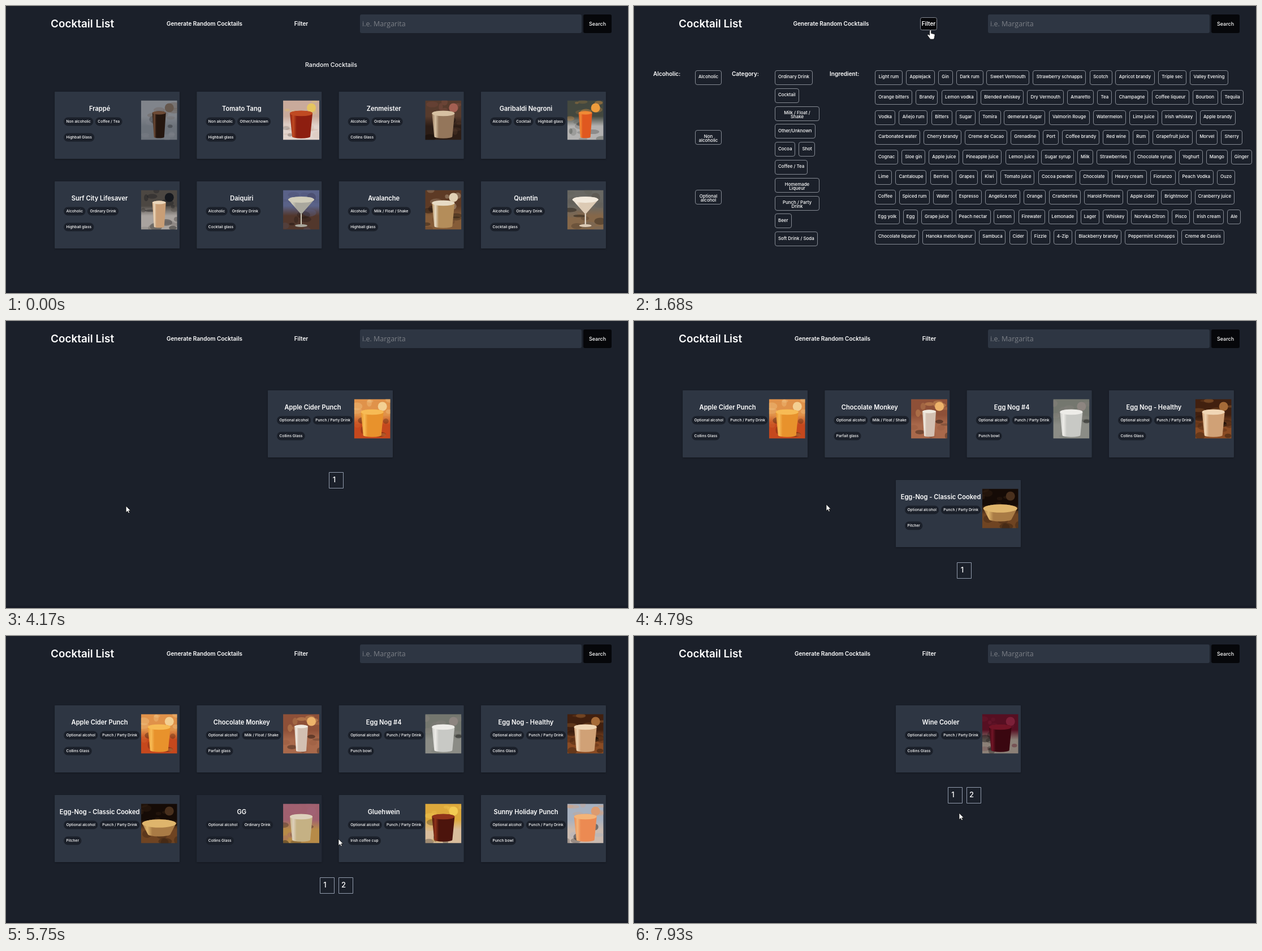
An HTML page with a canvas for the animation above (8000 ms loop, 1100x509 px).

```html
<!DOCTYPE html>
<html lang="en">
<head>
<meta charset="utf-8">
<title>Cocktail List</title>
<style>
html, body { margin: 0; width: 100%; height: 100%; overflow: hidden; background: #1b202a; }
canvas { display: block; }
</style>
</head>
<body>
<canvas id="stage" width="1100" height="509"></canvas>
<script>
const ctx = document.getElementById('stage').getContext('2d');
const LOOP = 8000, BG = '#1b202a', PANEL = '#2e3643', DARK = '#06070a';
const clamp = (v, lo, hi) => Math.min(hi, Math.max(lo, v));

// ---- drawing helpers ----
function text(s, x, y, size, weight = 500, align = 'center', color = '#fff', family = 'Inter') {
  ctx.font = `${weight} ${size}px "${family}", sans-serif`;
  ctx.textAlign = align;
  ctx.fillStyle = color;
  ctx.fillText(s, x, y + size * 0.36);
}
function width(s, size) {
  ctx.font = `500 ${size}px Inter, sans-serif`;
  return ctx.measureText(s).width;
}
function rect(fill, x, y, w, h, r = 0) {
  ctx.fillStyle = fill;
  ctx.beginPath();
  ctx.roundRect(x, y, w, h, r);
  ctx.fill();
}
function oval(fill, x, y, rx, ry = rx) {
  ctx.fillStyle = fill;
  ctx.beginPath();
  ctx.ellipse(x, y, rx, ry, 0, 0, 7);
  ctx.fill();
}
function frame(x, y, w, h, r, color, fill) {
  ctx.beginPath();
  ctx.roundRect(Math.round(x) + 0.5, Math.round(y) + 0.5, Math.round(w) - 1, Math.round(h) - 1, r);
  if (fill) { ctx.fillStyle = fill; ctx.fill(); }
  ctx.strokeStyle = color;
  ctx.lineWidth = 1;
  ctx.stroke();
}
function seeded(name) {
  let s = [...name].reduce((a, c) => a * 31 + c.charCodeAt(0) | 0, 7);
  return () => {
    s = Math.imul(s ^ s >>> 15, 2246822519) + 374761393 | 0;
    return ((s ^ s >>> 13) >>> 0) / 2 ** 32;
  };
}

// ---- cards: name, tags, then glass, wall, table, drink, foam and accent ----
const random = [
  'Frappé|Non alcoholic|Coffee / Tea|Highball Glass|tall #80848b #6c727a #24160f #6d4a35 #66584e',
  'Tomato Tang|Non alcoholic|Other/Unknown|Highball glass|wide #c9aa9b #e2d4cd #8d1e10 #c04a22 #e6c561',
  'Zenmeister|Alcoholic|Ordinary Drink|Collins Glass|wide #573b2d #2c1d16 #94765b #d6c0a2 #a35f52',
  'Garibaldi Negroni|Alcoholic|Cocktail|Highball glass|tall #43483f #b3b2b1 #e0581f #f08a35 #ee9c3c',
  'Surf City Lifesaver|Alcoholic|Ordinary Drink|Highball glass|tall #4c4742 #a9a39f #c99e76 #ead6bb #15181e',
  'Daiquiri|Alcoholic|Ordinary Drink|Cocktail glass|stem #5a6288 #52372c #a9a79d #d0ccba #4c5072',
  'Avalanche|Alcoholic|Milk / Float / Shake|Highball glass|wide #5d3a25 #855c38 #b48d5a #e7dbc5 #e0d0b5',
  'Quentin|Alcoholic|Ordinary Drink|Cocktail glass|stem #696863 #856749 #dccab4 #f2e9dc #5f5b54'
];
const filtered = [
  'Apple Cider Punch|Optional alcohol|Punch / Party Drink|Collins Glass|wide #e0924a #c5481d #e8922c #f7bb55 #f3cf92',
  'Chocolate Monkey|Optional alcohol|Milk / Float / Shake|Parfait glass|tall #8e5038 #a9694b #d3c0b2 #f0e9df #edb36a',
  'Egg Nog #4|Optional alcohol|Punch / Party Drink|Punch bowl|wide #74776f #8b8c86 #c8c9c5 #edece8 #8d8580',
  'Egg Nog - Healthy|Optional alcohol|Punch / Party Drink|Collins Glass|wide #41200f #8a4b23 #d0a176 #f0d6b5 #a66b38',
  'Egg-Nog - Classic Cooked|Optional alcohol|Punch / Party Drink|Pitcher|bowl #150b06 #6f4422 #a97b45 #dfb56c #49301d',
  'GG|Optional alcohol|Ordinary Drink|Collins Glass|wide #a0606f #b78b48 #c5b184 #ddd0bb #a16274',
  'Gluehwein|Optional alcohol|Punch / Party Drink|Irish coffee cup|wide #dda93c #d9bd9c #4c140c #90331a #f3cb52',
  'Sunny Holiday Punch|Optional alcohol|Punch / Party Drink|Punch bowl|wide #a7b1c0 #c9bab0 #ec8a52 #f4b478 #dc9b70'
];
const nextPage = [
  'Wine Cooler|Optional alcohol|Punch / Party Drink|Collins Glass|wide #560f22 #8b8077 #3a0710 #721426 #7b2038'
];

// rim and base radius, rim and base height
const glasses = { tall: [12, 9, 22, 65], wide: [20, 16, 23, 64], stem: [23, 1, 17, 42], bowl: [30, 20, 35, 54] };

// a glass on a table, in a 64 x 70 box
function picture(name, look) {
  const [kind, wall, table, drink, foam, accent] = look.split(' ');
  const [rim, base, top, bottom] = glasses[kind], rnd = seeded(name);
  const back = ctx.createLinearGradient(0, 0, 0, 70);
  [[0.4, wall], [0.65, table]].forEach(stop => back.addColorStop(...stop));
  rect(back, 0, 0, 64, 70);
  for (let i = 0; i < 18; i++) {
    ctx.globalAlpha = 0.15 + 0.25 * rnd();
    const y = 70 * rnd();
    oval(y < 32 ? accent : i % 2 ? '#000' : wall, 64 * rnd(), y, 3 + 9 * rnd(), 2 + 5 * rnd());
  }
  ctx.globalAlpha = 1;
  oval(accent, 50, 13, 8);
  if (kind == 'stem') {
    rect(foam, 31, bottom, 2, 20);
    oval(drink, 32, 63, 11, 2.5);
  }
  const body = ctx.createLinearGradient(32 - rim, 0, 32 + rim, 0);
  [drink, foam, drink, drink].forEach((c, i) => body.addColorStop([0, 0.15, 0.3, 1][i], c));
  ctx.fillStyle = body;
  ctx.beginPath();
  ctx.ellipse(32, top, rim, rim * 0.24, 0, Math.PI, 0);
  ctx.ellipse(32, bottom, base, base * 0.2, 0, 0, Math.PI);
  ctx.fill();
  oval(foam, 32, top, rim, rim * 0.24);
}

// ---- filter panel: row ends and labels ----
const ingredients = [
  [1051, 'Light rum|Applejack|Gin|Dark rum|Sweet Vermouth|Strawberry schnapps|Scotch|Apricot brandy|Triple sec|Valley Evening'],
  [1078, 'Orange bitters|Brandy|Lemon vodka|Blended whiskey|Dry Vermouth|Amaretto|Tea|Champagne|Coffee liqueur|Bourbon|Tequila'],
  [1064, 'Vodka|Añejo rum|Bitters|Sugar|Tomira|demerara Sugar|Valmorin Rouge|Watermelon|Lime juice|Irish whiskey|Apple brandy'],
  [1076, 'Carbonated water|Cherry brandy|Creme de Cacao|Grenadine|Port|Coffee brandy|Red wine|Rum|Grapefruit juice|Morvel|Sherry'],
  [1093, 'Cognac|Sloe gin|Apple juice|Pineapple juice|Lemon juice|Sugar syrup|Milk|Strawberries|Chocolate syrup|Yoghurt|Mango|Ginger'],
  [1063, 'Lime|Cantaloupe|Berries|Grapes|Kiwi|Tomato juice|Cocoa powder|Chocolate|Heavy cream|Fioranzo|Peach Vodka|Ouzo'],
  [1062, 'Coffee|Spiced rum|Water|Espresso|Angelica root|Orange|Cranberries|Harold Pinmere|Apple cider|Brightmoor|Cranberry juice'],
  [1073, 'Egg yolk|Egg|Grape juice|Peach nectar|Lemon|Firewater|Lemonade|Lager|Whiskey|Norvika Citron|Pisco|Irish cream|Ale'],
  [1044, 'Chocolate liqueur|Hanoka melon liqueur|Sambuca|Cider|Fizzle|4-Zip|Blackberry brandy|Peppermint schnapps|Creme de Cassis']
];
const categories = [
  'Ordinary Drink', 'Cocktail', 'Milk / Float /\nShake', 'Other/Unknown', 'Cocoa|Shot', 'Coffee / Tea',
  'Homemade\nLiqueur', 'Punch / Party\nDrink', 'Beer', 'Soft Drink / Soda'
];

function chip(label, x, y, w, hot) {
  frame(x, y, w, 26, 3.5, '#858a93', hot && DARK);
  label.split('\n').forEach((s, i) => text(s, x + w / 2, y + 11.5 + i * 6.7, 7.9));
}
function chipRow(labels, x, y, pad) {
  for (const s of labels) {
    const w = s.includes('\n') ? 79 : width(s, 7.9) + pad;
    chip(s, x, y, w);
    x += w + 6;
  }
}
function filterPanel(optionalHot) {
  [['Alcoholic:', 34], ['Category:', 173], ['Ingredient:', 346]].forEach(([s, x]) => text(s, x, 120, 10, 600, 'left'));
  ['Alcoholic', 'Non\nalcoholic', 'Optional\nalcohol'].forEach((s, i) => chip(s, 108, 114 + 105.9 * i, 47, i == 2 && optionalHot));
  categories.forEach((s, i) => chipRow(s.split('|'), 249, 114 + 31.8 * i, 12));
  ingredients.forEach(([end, names], i) => {
    const labels = names.split('|'), n = labels.length;
    const used = labels.reduce((sum, s) => sum + width(s, 7.9), 6 * (n - 1));
    chipRow(labels, 426, 114 + 35.35 * i, (end - 426 - used) / n);
  });
}

// ---- pointer: time and place of each turn ----
const path = [
  [120, 1065, 485], [870, 685, 216], [1080, 523, 43], [1720, 523, 43], [2100, 481, 149],
  [2920, 144, 282], [3060, 133, 323], [3280, 133, 333], [3890, 133, 333], [4170, 212, 328],
  [5470, 480, 322], [5750, 588, 360], [6300, 594, 399], [7050, 592, 434], [7580, 592, 434], [7930, 575, 314]
];
function pointer(t) {
  if (t < path[0][0]) return [-99, -99];
  const i = path.findIndex(k => k[0] > t);
  if (i < 0) return path.at(-1).slice(1);
  const a = path[i - 1], b = path[i], u = (t - a[0]) / (b[0] - a[0]);
  return [1, 2].map(k => a[k] + (b[k] - a[k]) * u);
}
function over(t, [x, y, w, h]) {
  const [px, py] = pointer(t);
  return px >= x && px < x + w && py >= y && py < y + h;
}
// share of the last 300 ms the pointer spent on a box
function hover(t, box) {
  let n = 0;
  for (let k = 0; k < 20; k++) n += over(t - k * 15, box);
  return n / 20;
}
const hand = new Path2D('M0 0q1.7-1 2.6.6v5l5 1q1.7.5 1.5 2l-1 5.5-1 1.9H1L-4 9q-.6-2 1.2-1.7L-.4 9Z');
const arrow = new Path2D('M0 0V11.6L2.7 9.2 4.5 13 6.4 12.1 4.7 8.5H8.2Z');
function drawPointer(t, shape) {
  ctx.save();
  ctx.translate(...pointer(t));
  ctx.lineWidth = 0.7;
  ctx.strokeStyle = '#000';
  ctx.fillStyle = '#fff';
  ctx.fill(shape);
  ctx.stroke(shape);
  ctx.restore();
}

// ---- views ----
function card(entry, box, t) {
  const [name, ...tags] = entry.split('|'), look = tags.pop();
  const [x, y, w, h] = box, heat = hover(t, box), scale = 1 + 0.05 * Math.max(0, 4 * heat - 3);
  ctx.save();
  ctx.translate(x + w / 2, y + h / 2);
  ctx.scale(scale, scale);
  ctx.translate(-w / 2, -h / 2);
  ctx.shadowColor = 'rgba(0,0,0,.3)';
  ctx.shadowBlur = 3;
  ctx.shadowOffsetY = 1;
  rect(PANEL, 0, 0, w, h, 1);
  ctx.shadowColor = 'transparent';
  ctx.globalAlpha = 0.55 * Math.min(1, 1.5 * heat);
  rect(BG, 0, 0, w, h, 1);
  ctx.globalAlpha = 1;
  text(name, 79.5, 30.5, 11.1, 600);
  let tx = 16, ty = 45.5;
  for (const tag of tags) {
    const tw = width(tag, 6.65) + 9;
    if (tx + tw > 157) { tx = 16; ty += 28; }
    rect(BG, tx, ty, tw, 15, 7.5);
    text(tag, tx + tw / 2, ty + 7.4, 6.65);
    tx += tw + 3.5;
  }
  ctx.translate(152.7, 15.5);
  ctx.beginPath();
  ctx.rect(0, 0, 64, 70);
  ctx.clip();
  picture(name, look);
  ctx.restore();
}
// rows of four, each row centred
function cards(list, top, t) {
  return list.map((entry, i) => {
    const row = i >> 2, inRow = Math.min(4, list.length - row * 4);
    const box = [463 + (i % 4 - (inRow - 1) / 2) * 251.3, top + row * 159, 221, 119];
    card(entry, box, t);
    return box;
  });
}
function pager(pages, y) {
  return Array.from({ length: pages }, (_, i) => {
    const box = [571 + (i - (pages - 1) / 2) * 33, y, 26, 29];
    frame(...box, 0, '#929cad');
    text(i + 1, box[0] + 9.5, y + 13.5, 13);
    return box;
  });
}
function header(hot) {
  text('Cocktail List', 79, 31.5, 18.9, 600, 'left');
  text('Generate Random Cocktails', hot ? 348.5 : 351, 31.5, 10, 600);
  if (hot) frame(506, 20, 30, 23, 3, '#858a93', DARK);
  text('Filter', hot ? 521 : 522, 31.5, 10, 600);
  rect(PANEL, 626, 15, 392, 33, 3);
  text('i.e. Margarita', 630, 31.5, 12.5, 400, 'left', '#7b7f86', 'Open Sans');
  rect(DARK, 1021, 15, 50, 33, 3);
  text('Search', 1046, 31.5, 9);
}

function render(t) {
  const filterBox = [506, 20, 30, 25], optionalBox = [108, 326, 47, 26], hot = [filterBox];
  rect(BG, 0, 0, 1100, 509);
  rect('#171b26', 0, 505, 1100, 4);
  header(over(t, filterBox));
  if (t < 1340) {
    text('Random Cocktails', 575, 104.5, 10.7);
    hot.push(...cards(random, 152, t));
  } else if (t < 3550) {
    filterPanel(over(t, optionalBox));
    hot.push(optionalBox);
  } else if (t >= 3690 && t < 7180) {
    // results arrive one by one; the ninth opens a second page
    const found = clamp(1 + Math.floor((t - 4180) / 135), 1, 9);
    hot.push(...cards(filtered.slice(0, found), 123, t));
    hot.push(...pager(found > 8 ? 2 : 1, found > 4 ? 428 : 268));
  } else if (t >= 7250) {
    hot.push(...cards(nextPage, 123, t), ...pager(2, 268));
  }
  drawPointer(t, hot.some(box => over(t, box)) ? hand : arrow);
}

const start = performance.now();
(function tick() {
  render((performance.now() - start) % LOOP);
  requestAnimationFrame(tick);
})();
</script>
</body>
</html>
```
